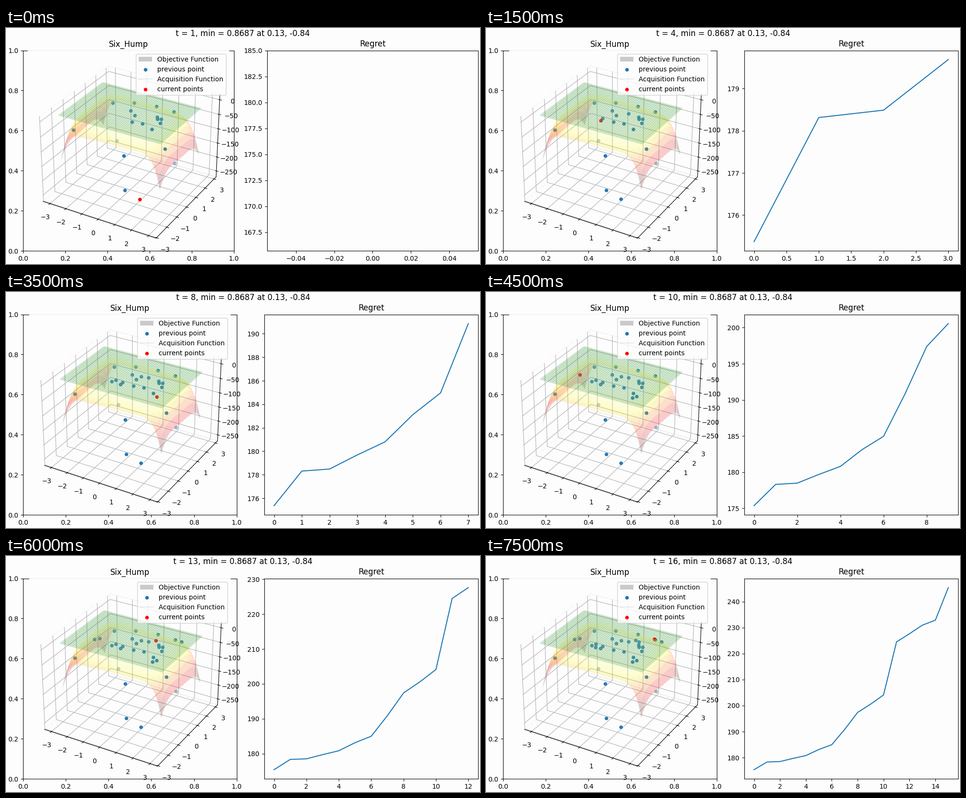
A matplotlib script for the animation above (8 s loop, 1000 by 500 pixels).

```python
import matplotlib.pyplot as plt
import numpy as np
from matplotlib.animation import FuncAnimation
from matplotlib.lines import Line2D
from matplotlib.patches import Patch

W, H = 1000, 500
TOP, BOTTOM = 47.6, 472
LEFT, RIGHT = 36, 995.83
BLUE, RED, PAPER = "#1f77b4", "red", "#fdfdfd"
STEP_MS = 500

plt.rcParams.update({
    "font.family": "DejaVu Sans",
    "figure.facecolor": PAPER,
    "axes.facecolor": PAPER,
})


def six_hump(x, y):
    return (4 - 2.1 * x**2 + x**4 / 3) * x**2 + x * y + (4 * y**2 - 4) * y**2


# Samples (x, y) known at the start: a few outlying ones, the rest on the plateau
rng = np.random.default_rng(4)
outer = [(1.36, -2.625), (1, -2.15), (2.73, -1.09), (1.04, 2.895),
         (-2.6, 2.745), (-2.25, -1.81)]
plateau = rng.uniform((-2, -1.2), (2, 1.4), (13, 2))

# The sample tried at each step; the regret follows from it
picks = np.array([
    (2.236, -2.657), (0.86, 0.264), (0, -0.83), (0, -1.02),
    (-0.446, -0.763), (-0.57, -0.95), (0.49, 0.16), (2.147, -1.074),
    (2.028, -1.27), (-1.527, -0.605), (-1.716, -0.799), (2.09, 1.495),
    (1.1, 0.561), (1.34, 0.49), (-0.29, -1.03), (1.717, 1.385)])
samples = np.vstack([outer, plateau, picks])
first = len(samples) - len(picks)
regret = np.cumsum(six_hump(*picks.T) + 1.0316)


def span(left, right):
    return [left / W, 1 - BOTTOM / H, (right - left) / W, (BOTTOM - TOP) / H]


fig = plt.figure(figsize=(W / 100, H / 100), dpi=100)
frame_ax = fig.add_axes(span(LEFT, 481), label="frame")
regret_ax = fig.add_axes(span(551, RIGHT), label="regret")
cube = fig.add_axes(span(LEFT, 481), label="cube", projection="3d",
                    computed_zorder=False)
frame_ax.set_title("Six_Hump")
headline = fig.text(0.5, 1 - 2.7 / H, "", size=12, ha="center", va="top")

gx, gy = np.meshgrid(np.linspace(-3, 3, 50), np.linspace(-2, 2, 50))
cube.plot_surface(gx, gy, -six_hump(gx, gy), cmap="hot", alpha=0.2, zorder=3)
cube.plot_wireframe(gx, gy, np.zeros_like(gx), color="green", alpha=0.13,
                    zorder=4)
cube.set(xlim=(-3.4375, 3.4375), ylim=(-3.04, 3.24), zlim=(-271.5, 19))
for axis in (cube.xaxis, cube.yaxis, cube.zaxis):
    axis.pane.fill = False

handles = [
    Patch(fc="black", alpha=0.2, lw=0, label="Objective Function"),
    frame_ax.scatter([], [], s=20, color=BLUE, label="previous point"),
    Line2D([], [], color="green", alpha=0.1, label="Acquisition Function"),
    frame_ax.scatter([], [], s=20, color=RED, label="current points"),
]
cube.legend(handles=handles, loc="upper right")
frame_ax.set(xlim=(0, 1), ylim=(0, 1))
dots = []


def add_dots(points, color):
    x, y = points.T
    dots.append(cube.scatter(x, y, -six_hump(x, y), color=color, zorder=2))


def update(i):
    t = i + 1
    # Shorter tick labels from the fourth step on leave wider panels
    width = 444.8 if t < 4 else 450.8
    for ax in (frame_ax, cube):
        ax.set_position(span(LEFT, LEFT + width))
    regret_ax.set_position(span(RIGHT - width, RIGHT))

    headline.set_text(f"t = {t}, min = 0.8687 at 0.13, -0.84")
    while dots:
        dots.pop().remove()
    add_dots(samples[:first + i], BLUE)
    add_dots(samples[first + i:first + t], RED)

    regret_ax.clear()
    regret_ax.plot(range(t), regret[:t], color=BLUE)
    regret_ax.set_title("Regret")


anim = FuncAnimation(fig, update, frames=len(picks), interval=STEP_MS,
                     init_func=lambda: update(0), repeat=True)
plt.show()
```
